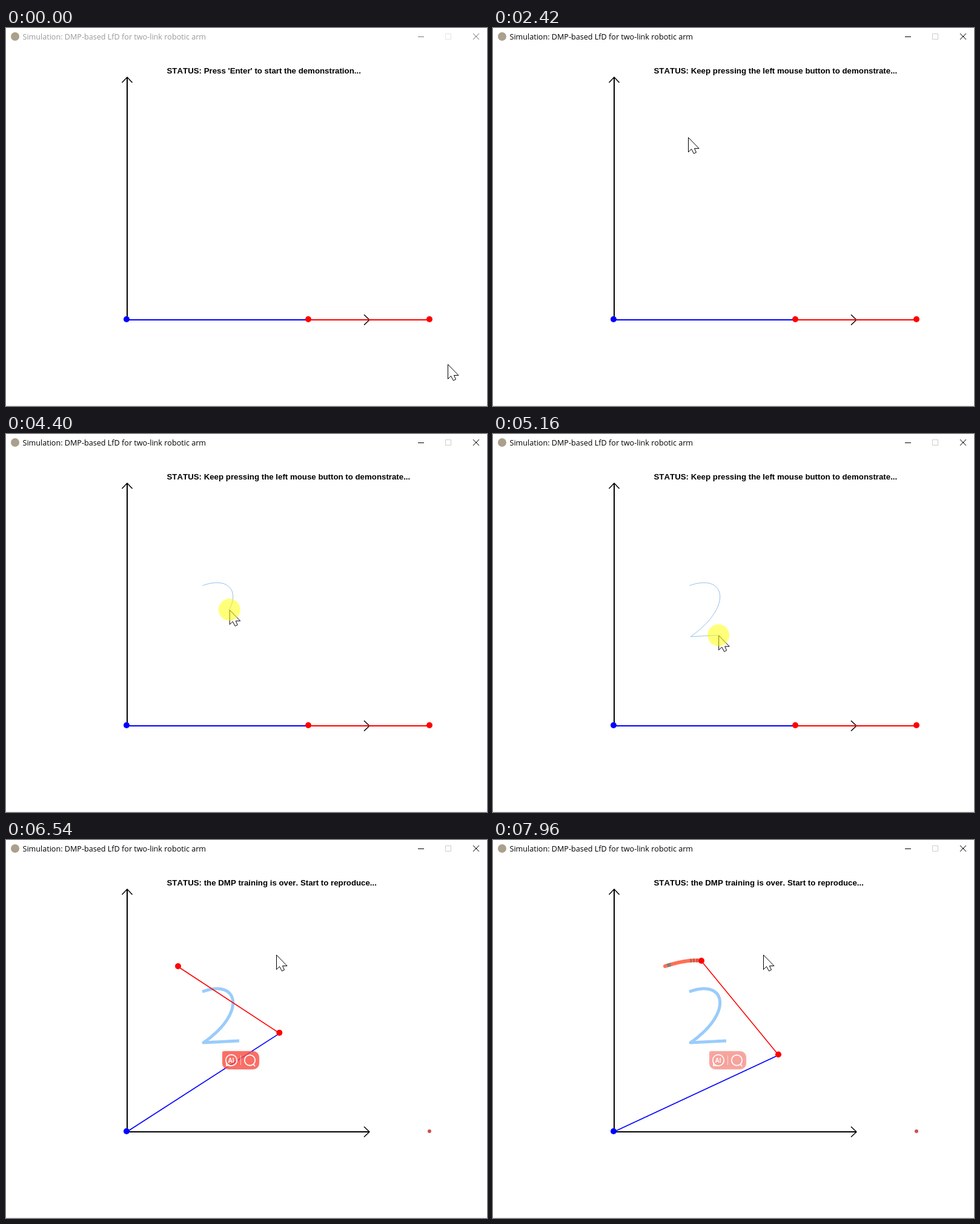
Animation of 794x623 px, one loop 8000 ms. Source, as an HTML page with a canvas:

```html
<!DOCTYPE html>
<html lang="en">
<head>
<meta charset="utf-8">
<title>Two-link robotic arm</title>
<style>
  html, body { margin: 0; width: 100%; height: 100%; overflow: hidden; background: #fff; }
  canvas { display: block; }
</style>
</head>
<body>
<canvas id="stage" width="794" height="623"></canvas>
<script>
const ctx = document.getElementById('stage').getContext('2d');
const LOOP = 8000, ACTIVE = 330, READY = 1320, PRESS = 3650, RELEASE = 5700, BADGE = 6540, REPLAY = 6770;
const BASE = [199, 480], REACH = [699, 480], LINK1 = 300, LINK2 = 200;

const smooth = u => u * u * (3 - 2 * u);
const slowDown = power => u => 1 - (1 - u) ** power;
const clamp = u => Math.min(1, Math.max(0, u));

// A move follows a Bezier curve of any degree
const move = (start, end, ease, ...curve) => ({
  start, curve, at: t => bezier(curve, ease(clamp((t - start) / (end - start))))
});

function bezier(points, u) {
  if (points.length === 1) return points[0];
  return bezier(points.slice(1).map(([x, y], i) => {
    const [px, py] = points[i];
    return [px + (x - px) * u, py + (y - py) * u];
  }), u);
}

// The demonstrated digit: a hook, then its foot
const hook = move(PRESS, 4830, smooth, [324, 250], [384, 228], [398, 284], [326, 334]);
const foot = move(4830, 5450, slowDown(2), [326, 334], [385, 331]);
const cursorMoves = [
  move(70, 470, smooth, [729, 554], [487, 281]),
  move(1930, 2420, smooth, [487, 281], [322, 180]),
  move(2500, 3450, smooth, [322, 180], [324, 250]),
  hook, foot,
  move(RELEASE, 6270, smooth, [385, 331], [446, 189])
];
const replay = move(REPLAY, 7960, slowDown(1.3), [284, 208], [322, 196], [344, 199]);

function cursorAt(t) {
  const current = cursorMoves.filter(m => m.start <= t).pop() || cursorMoves[0];
  return current.at(t);
}

function trail(from, to, position) {
  const points = [];
  for (let t = from; t < to; t += 20) points.push(position(t));
  return [...points, position(to)];
}

function path(points, color, width = 1) {
  ctx.beginPath();
  points.forEach(p => ctx.lineTo(...p));
  ctx.strokeStyle = color;
  ctx.lineWidth = width;
  ctx.stroke();
}

function dot([x, y], r, color) {
  ctx.beginPath();
  ctx.arc(x, y, r, 0, 2 * Math.PI);
  ctx.fillStyle = color;
  ctx.fill();
}

function ring(x, y, r) {
  ctx.beginPath();
  ctx.arc(x, y, r, 0, 2 * Math.PI);
  ctx.stroke();
}

function text(str, x, y, font, color) {
  ctx.font = font;
  ctx.fillStyle = color;
  ctx.fillText(str, x, y);
}

function drawWindow(active) {
  dot([15, 14], 7, '#aaa08c');
  text('Simulation: DMP-based LfD for two-link robotic arm', 27.5, 19,
    '12.6px "Open Sans", "Noto Sans", sans-serif', active ? '#000' : '#999');
  const ink = active ? '#000' : '#777';
  path([[680, 14.5], [690, 14.5]], ink);
  path([[771, 9], [781, 19]], ink);
  path([[781, 9], [771, 19]], ink);
  ctx.strokeStyle = active ? '#ccc' : '#e4e4e4';
  ctx.strokeRect(725.5, 9.5, 9, 9);
  path([[0, 622.5], [794, 622.5]], '#eee');
}

function drawAxis(angle) {
  ctx.save();
  ctx.translate(200, 481);
  ctx.rotate(angle);
  path([[-1, 0], [400, 0]], '#000', 2);
  path([[391, -8.5], [400, 0], [391, 8.5]], '#000', 1.5);
  ctx.restore();
}

function elbowFor([x, y]) {
  const dx = x - BASE[0], dy = BASE[1] - y, r = Math.hypot(dx, dy);
  const cos = (LINK1 ** 2 + r * r - LINK2 ** 2) / (2 * LINK1 * r);
  const angle = Math.atan2(dy, dx) - Math.acos(Math.min(1, cos));
  return [BASE[0] + LINK1 * Math.cos(angle), BASE[1] - LINK1 * Math.sin(angle)];
}

function drawLink(a, b, color) {
  const dx = Math.abs(b[0] - a[0]), dy = Math.abs(b[1] - a[1]);
  const width = 2 * Math.max(dx, dy) / Math.hypot(dx, dy);
  path([a, b].map(([x, y]) => [x + .4, y + 1]), color, width);
}

function drawArm(hand) {
  const elbow = elbowFor(hand);
  drawLink(BASE, elbow, '#00f');
  drawLink(elbow, hand, '#f00');
  dot(BASE, 5, '#00f');
  dot(elbow, 5, '#f00');
  dot(hand, 5, '#f00');
}

function drawDemonstration(t) {
  const trained = t >= RELEASE;
  path(trail(PRESS, Math.min(t, 5450), cursorAt), trained ? '#9accfa' : '#90beea', trained ? 5 : 1);
}

function drawReplay(t) {
  const points = trail(REPLAY, t, replay.at);
  path(points, '#ff7055', 6);
  dot(points[0], 3, '#ff7055');
  path(points.filter(([x]) => x > 287 && x < 295), '#808080', 6);
  ctx.setLineDash([2, 3]);
  path(points.filter(([x]) => x > 325), '#b05048', 6);
  ctx.setLineDash([]);
}

function drawBadge(t) {
  const alpha = .8 - .32 * clamp((t - 6800) / 1160);
  ctx.save();
  ctx.beginPath();
  ctx.roundRect(357, 348, 61, 30, [3, 10, 10, 10]);
  ctx.fillStyle = `rgba(255, 82, 70, ${alpha})`;
  ctx.shadowColor = 'rgba(0, 0, 0, .15)';
  ctx.shadowBlur = 4;
  ctx.fill();
  ctx.restore();

  path([[387.5, 355], [387.5, 371]], 'rgba(255, 255, 255, .6)');
  path([[408, 369], [411, 373]], '#fff', 1.7);
  ring(402.5, 363, 8.7);
  ring(372, 363, 9.2);
  path([[364, 366], [364, 372], [371, 372]], '#fff', 1.7);
  text('AI', 366.6, 366.7, 'bold 10px "Liberation Sans", Arial, sans-serif', '#fff');
}

function drawCursor([x, y], pressed) {
  ctx.save();
  ctx.translate(x + .5, y + .5);
  const arrow = new Path2D('M0 0V24L5 19 9 26.5 13 24.5 10 18H17.5Z');
  ctx.fillStyle = '#fff';
  ctx.fill(arrow);
  ctx.strokeStyle = '#000';
  ctx.lineWidth = 1;
  ctx.stroke(arrow);
  ctx.restore();
  if (pressed) dot([x, y], 18, 'rgba(255, 255, 0, .52)');
}

function status(t) {
  if (t < READY) return "Press 'Enter' to start the demonstration...";
  if (t < RELEASE) return 'Keep pressing the left mouse button to demonstrate...';
  return 'the DMP training is over. Start to reproduce...';
}

function draw(t) {
  const trained = t >= RELEASE;
  ctx.fillStyle = '#fff';
  ctx.fillRect(0, 0, 794, 623);
  drawWindow(t >= ACTIVE);
  text('STATUS: ' + status(t), 265.5, 75, 'bold 13.28px "Liberation Sans", Arial, sans-serif', '#000');
  drawAxis(0);
  drawAxis(-Math.PI / 2);
  if (t >= PRESS) drawDemonstration(t);
  if (trained) dot(REACH, 3, '#d05050');
  if (t >= REPLAY) drawReplay(t);
  drawArm(trained ? replay.at(t) : REACH);
  if (t >= BADGE) drawBadge(t);
  drawCursor(cursorAt(t), t >= PRESS && !trained);
}

ctx.fontKerning = 'none';
ctx.lineJoin = 'round';
const start = performance.now();
function frame(now) {
  draw(Math.max(0, now - start) % LOOP);
  requestAnimationFrame(frame);
}
draw(0);
requestAnimationFrame(frame);
</script>
</body>
</html>
```
